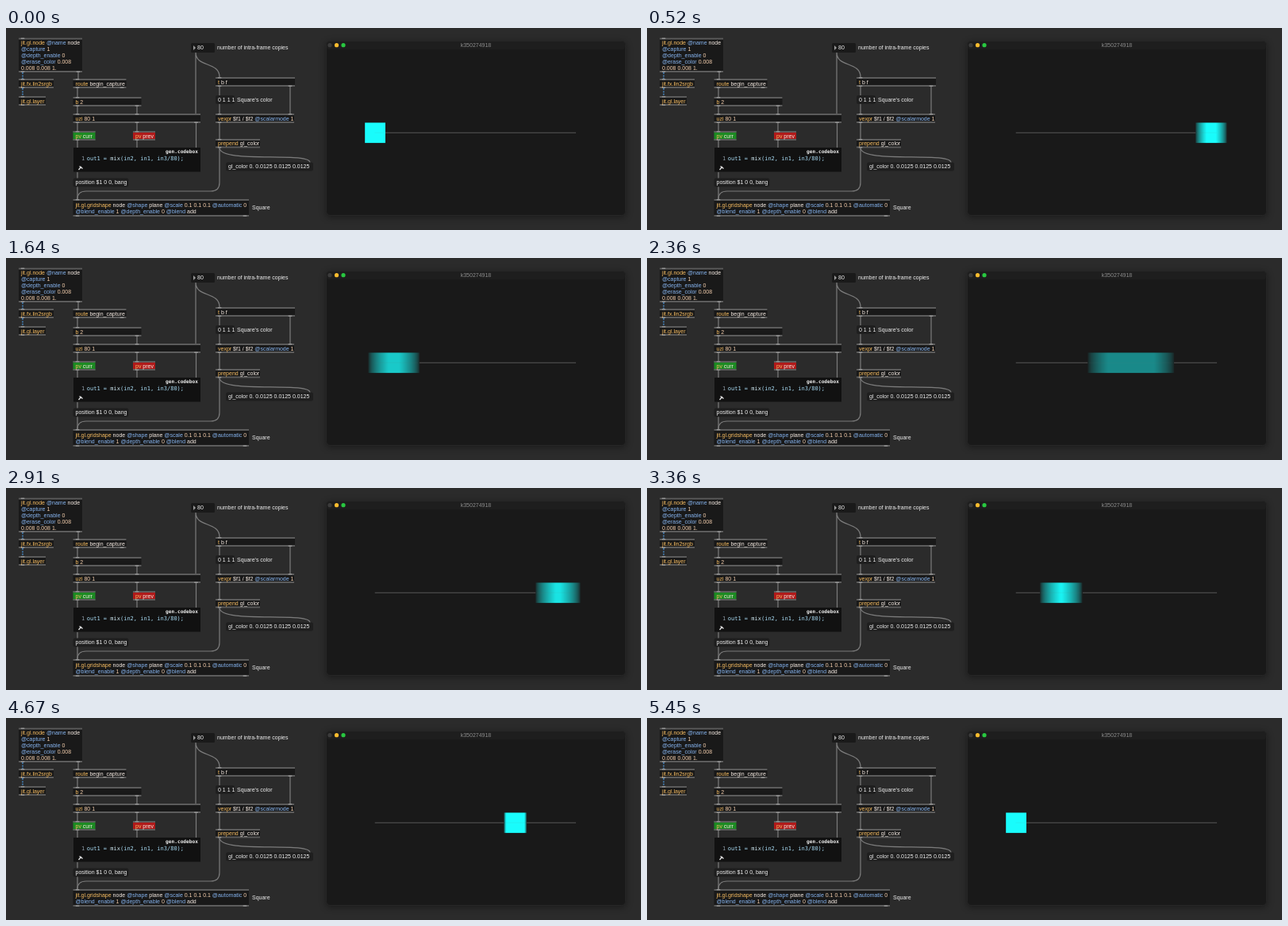
An HTML page with a canvas for the animation above (5480 ms loop, 800 by 255 pixels).

```html
<!DOCTYPE html>
<html lang="en">
<head>
<meta charset="utf-8">
<title>Motion blur patch</title>
<style>
  html, body { margin: 0; width: 100%; height: 100%; overflow: hidden; background: #2b2b2b; }
  svg, canvas { position: absolute; left: 0; top: 0; display: block; }
  text { font: 7px "Liberation Sans", Arial, sans-serif; fill: #f0f0f0; white-space: pre; }
  .name { fill: #f7bd62; }
  .attr { fill: #86b4ef; }
  .arg { fill: #f7ece4; }
  .num { fill: #f5cfae; }
  .plain { fill: #f0f0f0; }
  .code { font: 7px "DejaVu Sans Mono", monospace; fill: #a9dcf5; }
  .head { font: bold 6.2px "DejaVu Sans Mono", monospace; fill: #f0f0f0; }
  .cord { fill: none; stroke: #7c7c7c; stroke-width: 1.2; }
  .gl { stroke: #4b9be0; stroke-dasharray: 2 1.4; }
  .window { filter: drop-shadow(0 2px 4px rgba(0, 0, 0, .4)); }
</style>
</head>
<body>
<svg id="patch" width="800" height="255" viewBox="0 0 800 255"></svg>
<canvas id="stage" width="800" height="255"></canvas>
<script>
const parts = [];
const add = s => parts.push(s);

const rect = (x, y, w, h, fill, r = 0, extra = "") =>
  add(`<rect x="${x}" y="${y}" width="${w}" height="${h}" rx="${r}" fill="${fill}" ${extra}/>`);

const label = (x, y, s, cls = "plain", extra = "") =>
  add(`<text x="${x}" y="${y}" class="${cls}" ${extra}>${s}</text>`);

const cord = (d, cls = "") => add(`<path class="cord ${cls}" d="${d}"/>`);

// Colour each word: object name first, then attributes, numbers and symbols.
function words(line, first) {
  return line.split(" ").map((w, i) => {
    const cls = first && i === 0 ? "name" : w[0] === "@" ? "attr" : isNaN(w) ? "arg" : "num";
    return `<tspan class="${cls}">${w}</tspan>`;
  }).join(" ");
}

function bars(x, y, w, h, ins, outs) {
  rect(x, y, w, 2, "#5c5c5c");
  rect(x, y + h - 2, w, 2, "#5c5c5c");
  const port = (px, py) => rect(px - 2.5, py, 5, 1.6, "#949494", 0.8);
  ins.forEach(p => port(p, y));
  outs.forEach(p => port(p, y + h - 1.6));
}

function box(x, y, w, h, lines, ins, outs, fill = "#191919") {
  rect(x, y, w, h, fill);
  bars(x, y, w, h, ins, outs);
  const top = y + h / 2 + 2.5 - (lines.length - 1) * 4;
  lines.forEach((s, i) => label(x + 3, top + i * 8, words(s, i === 0)));
}

function message(x, y, w, s) {
  rect(x, y, w, 11, "#1f1f1f", 2.5);
  label(x + 3, y + 7.8, s);
}

// Cords
cord("M21 56V64M21 76V86", "gl");
cord("M91 56V64M90 76V87M90 99V108M165 99V108M90 120V130M165 120V130M239.5 120V151");
cord("M90 141V151M165 141V151M90 182V190M90 200V216");
cord("M239 31V108M239 31C239 50 269 42 269 62");
cord("M269 73V85M358 73V108M269 96V108M269 120V140");
cord("M269 151C269 172 383 155 383 170");
cord("M269 151V195Q269 206 258 206H101Q90 206 90 216");

// Left column
box(16, 12.5, 80, 43.5, ["jit.gl.node @name node", "@capture 1", "@depth_enable 0",
  "@erase_color 0.008", "0.008 0.008 1."], [21], [21, 91]);
box(16, 64, 44, 12, ["jit.fx.lin2srgb"], [21], [21]);
box(16, 86, 34, 12, ["jit.gl.layer"], [21], [21]);

// Middle column
box(84.5, 64, 67, 12, ["route begin_capture"], [90], [90, 146]);
box(84.5, 87, 86, 12, ["b 2"], [90], [90, 165]);
box(84.5, 108, 160.5, 12, ["uzi 80 1"], [90, 165], [90, 165, 239.5]);
box(84.5, 130, 28, 12, ["pv curr"], [90], [90], "#1c8a22");
box(160, 130, 28, 12, ["pv prev"], [165], [165], "#b01a1a");

rect(85, 151, 160, 30.5, "#111");
label(242, 158.3, "gen.codebox", "head", 'text-anchor="end"');
label(95, 166.6, "1", "code", 'style="fill:#8d9aa5"');
label(101.8, 166.6, 'out1 = <tspan fill="#cfe8f2">mix</tspan>(in2, in1, in3/80);', "code");
add('<path d="M91.5 179L95 175M92.5 174.5L96.500 177.5" stroke="#ddd" stroke-width="1.4"/>');

message(84.5, 189.5, 70, "position $1 0 0, bang");
box(84.5, 216, 221.5, 22, ["jit.gl.gridshape node @shape plane @scale 0.1 0.1 0.1 @automatic 0",
  "@blend_enable 1 @depth_enable 0 @blend add"], [90], [90, 301]);
label(310, 229, "Square");

// Right column
rect(233, 19, 30, 12, "#1a1a1a", 1.5);
add('<path d="M236 22L239 25L236 28Z" fill="#9a9a9a"/>');
label(241, 27.3, "80");
label(266, 27.3, "number of intra-frame copies");
box(264, 62, 100, 12, ["t b f"], [269], [269, 358]);
message(264, 85, 24, "0 1 1 1");
label(291, 92.8, "Square's color");
box(264, 108, 99, 12, ["vexpr $f1 / $f2 @scalarmode 1"], [269, 358], [269]);
box(264, 140, 56, 11.5, ["prepend gl_color"], [269], [269]);
message(277, 169.5, 110, "gl_color 0. 0.0125 0.0125 0.0125");

// Render window
rect(403.5, 16.5, 377, 220, "#191919", 5, 'class="window" stroke="#262626"');
rect(404, 17, 376, 10, "#1e1e1e", 4);
["#3c3c3c", "#febc2e", "#28c840"].forEach((c, i) =>
  add(`<circle cx="${408 + i * 8.5}" cy="21.7" r="2.6" fill="${c}"/>`));
label(592, 24.3, "k350274918", "plain", 'text-anchor="middle" style="fill:#8c8c8c"');

document.getElementById("patch").innerHTML = parts.join("");

const ctx = document.getElementById("stage").getContext("2d");
const LOOP = 5480, STEP = 30.28, SHUTTER = 1 / 60, COPIES = 80;
const LEFT = 464.7, RIGHT = 718, HALF = 12.8, MID_Y = 132.3;

// The oscillator's pace swells and fades: [seconds, cycles done, Hz]
const pace = [
  [0, 0.012, 1.5], [0.939, 3.366, 4.7], [1.635, 7.135, 5.7],
  [2.362, 11.78, 6.5], [2.907, 14.627, 4.4], [3.846, 16.965, 0.83],
  [4.481, 17.275, 0.25], [5.057, 17.487, 0.75], [5.45, 18.012, 1.5]
];

// Cubic Hermite between the pace points
function cycles(t) {
  if (t < 0) return pace[0][1] + t * pace[0][2];
  let i = 0;
  while (i < pace.length - 2 && t > pace[i + 1][0]) i++;
  const [t0, p0, v0] = pace[i], [t1, p1, v1] = pace[i + 1];
  const d = t1 - t0, u = (t - t0) / d, w = 1 - u;
  return p0 * w * w * (1 + 2 * u) + p1 * u * u * (3 - 2 * u) + d * u * w * (v0 * w - v1 * u);
}

const place = t =>
  (LEFT + RIGHT) / 2 - (RIGHT - LEFT) / 2 * Math.cos(2 * Math.PI * cycles(t));

function drawLine(alpha) {
  ctx.fillStyle = `rgba(112,112,112,${alpha})`;
  ctx.fillRect(LEFT, 131.7, RIGHT - LEFT, 1);
}

function draw(t) {
  const now = place(t), prev = place(t - SHUTTER);
  ctx.clearRect(0, 0, 800, 255);
  drawLine(0.7);
  const from = Math.floor(Math.min(now, prev) - HALF);
  const to = Math.ceil(Math.max(now, prev) + HALF);
  for (let x = from; x < to; x++) {
    let sum = 0;
    for (let k = 1; k <= COPIES; k++) {
      const c = prev + (now - prev) * k / COPIES;
      sum += Math.max(0, Math.min(x + 1, c + HALF) - Math.max(x, c - HALF));
    }
    if (sum <= 0) continue;
    const g = Math.round(25 + 227 * Math.pow(sum / COPIES, 0.6));
    ctx.fillStyle = `rgb(25,${g},${g})`;
    ctx.fillRect(x, MID_Y - HALF, 1, 2 * HALF);
  }
  drawLine(0.08);
}

const start = performance.now();
function tick() {
  const ms = (performance.now() - start) % LOOP;
  draw(Math.min(180, Math.floor((ms + 3) / STEP)) * STEP / 1000);
  requestAnimationFrame(tick);
}
tick();
</script>
</body>
</html>
```
